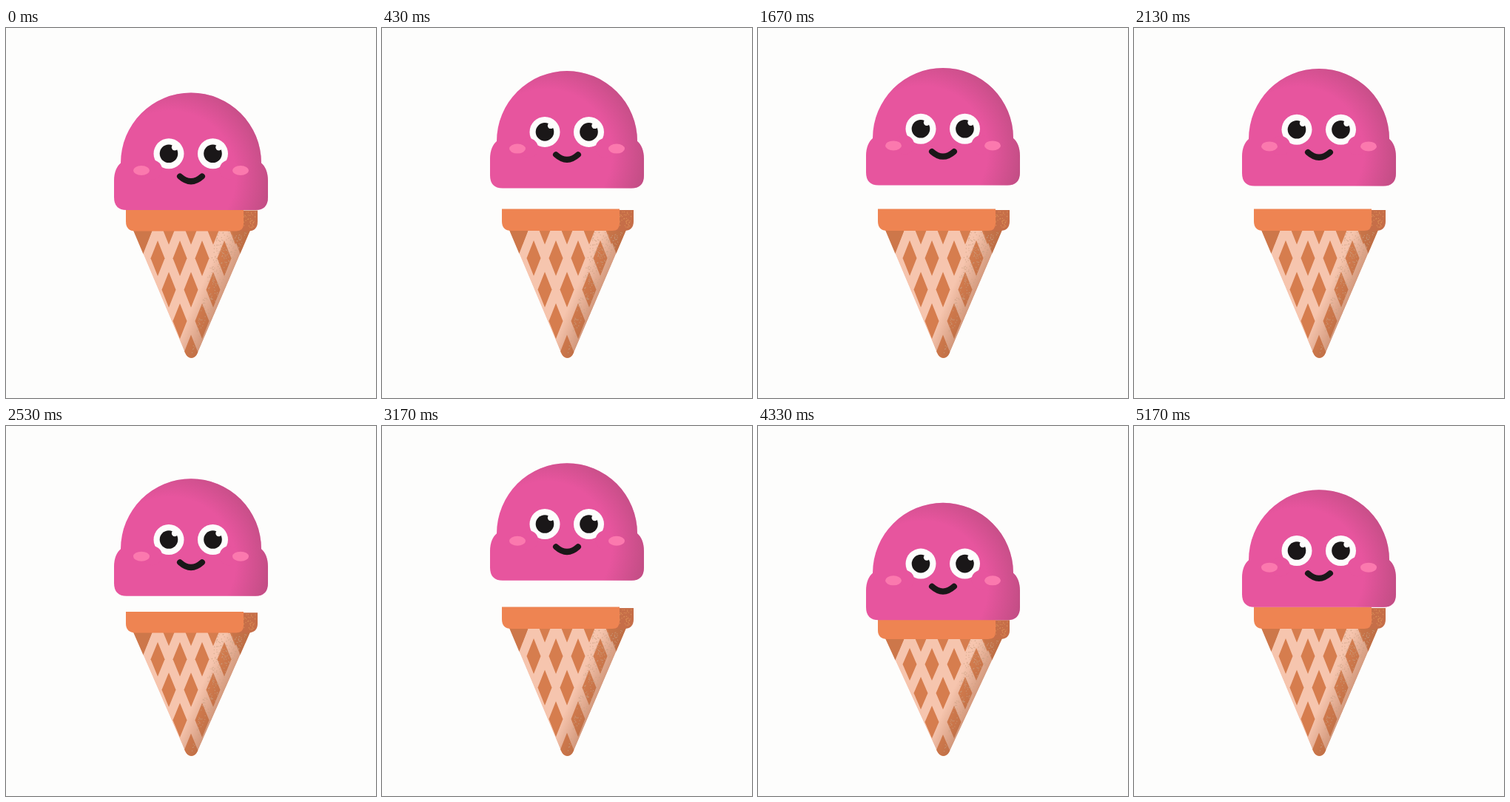
An HTML page that plays this animation: 500 px wide and 500 px high, repeating every 5210 ms.

```html
<!DOCTYPE html>
<html lang="en">
<head>
<meta charset="utf-8">
<title>Bouncing ice cream</title>
<style>
  html, body { margin: 0; width: 100%; height: 100%; overflow: hidden; background: #fdfdfc; }
  svg { display: block; width: 100vw; height: 100vh; }
</style>
</head>
<body>
<svg viewBox="0 0 500 500">
  <defs>
    <radialGradient id="scoopShade" gradientUnits="userSpaceOnUse" cx="222" cy="200" r="134">
      <stop offset=".66" stop-color="#b04a78" stop-opacity="0"/>
      <stop offset="1" stop-color="#b04a78" stop-opacity=".65"/>
    </radialGradient>
    <linearGradient id="coneShade" gradientUnits="userSpaceOnUse" x1="272" y1="330" x2="312" y2="348">
      <stop offset="0" stop-color="#a8623f" stop-opacity="0"/>
      <stop offset="1" stop-color="#a8623f" stop-opacity=".6"/>
    </linearGradient>
    <path id="wafer" d="M172 273H330L259 439Q256 446 250.500 446Q245 446 242 439Z"/>
    <path id="body" d="M155 182A95 95 0 0 1 345 182C350 186 354 194 354 206V228Q354 245.500 337 245.500H163Q146 245.500 146 228V206C146 194 150 186 155 182Z"/>
    <clipPath id="waferClip"><use href="#wafer"/></clipPath>
  </defs>

  <g id="cone">
    <g clip-path="url(#waferClip)">
      <use href="#wafer" fill="#f6c5ae"/>
      <g id="diamonds" fill="#d67d4e"></g>
      <path d="M170 272H198L185 306Z M332 272H304L317 306Z" fill="#cd774a"/>
      <use href="#wafer" fill="url(#coneShade)"/>
      <g id="grain" fill="#c9a184" opacity=".7"></g>
    </g>
    <path d="M300 246H340V261Q340 274 327 274H300Z" fill="#c66e48"/>
    <g id="rimGrain" fill="#e39a5c" opacity=".7"></g>
    <path d="M162 244.500H321V264Q321 274 311 274H175Q162 274 162 261Z" fill="#ee8452"/>
  </g>

  <g id="scoop">
    <use href="#body" fill="#e7559e"/>
    <use href="#body" fill="url(#scoopShade)"/>
    <g id="eyes"></g>
    <g fill="#fb79ae">
      <ellipse cx="183" cy="192" rx="11" ry="6.500"/>
      <ellipse cx="317" cy="192" rx="11" ry="6.500"/>
    </g>
    <path d="M235 200Q250 213.500 265 200" fill="none" stroke="#1a1718" stroke-width="8" stroke-linecap="round"/>
  </g>
</svg>
<script>
const $ = id => document.getElementById(id);

function add(parent, tag, attrs) {
  const el = document.createElementNS("http://www.w3.org/2000/svg", tag);
  for (const k in attrs) el.setAttribute(k, attrs[k]);
  parent.append(el);
}

// waffle pattern: staggered rows of diamonds
for (let row = 0; row < 5; row++) {
  const y = 268.5 + row * 42.5;
  for (let col = -3; col <= 3; col++) {
    const x = 250 + col * 30 + (row % 2 ? 15 : 0);
    add($("diamonds"), "path", { d: `M${x} ${y - 24}l9.5 24l-9.5 24l-9.5 -24Z` });
  }
}

// shaded grain along the right side of cone and rim
let seed = 7;
const random = () => (seed = seed * 16807 % 2147483647) / 2147483647;
for (let i = 0; i < 260; i++) {
  const k = Math.sqrt(random());
  const x = 251 + k * (34 + 40 * random());
  add($("grain"), "circle", { cx: x, cy: 440 - k * 164, r: 0.7 });
}
for (let i = 0; i < 40; i++) {
  add($("rimGrain"), "circle", { cx: 320 + 17 * random(), cy: 248 + 22 * random(), r: 0.7 });
}

// white, pupil and glint, with the cheek covering the lower outer rim
for (const [x, side] of [[220, -1], [279.5, 1]]) {
  const dot = (cx, cy, r, fill) => add($("eyes"), "circle", { cx, cy, r, fill });
  dot(x, 169.3, 20.5, "#fdfdfc");
  dot(x + side * 22, 191, 13, "#e7559e");
  dot(x, 169.3, 12.3, "#1a1718");
  dot(x + 8, 160.8, 4.2, "#fdfdfc");
}

// eleven bounces, then a short hold just before touchdown
const LOOP = 5210, BOUNCE = 470, LAST = 11 * BOUNCE - 0.5;

// [phase, downward shift]
const scoopSteps = [[0, 0], [.11, 24], [.213, 17], [.383, -15.5], [.553, -33],
  [.71, -37], [.872, -33], [.979, -16.5], [1, 0]];
const coneSteps = [[0, 0], [.11, 23.5], [.213, 16.5], [.383, 6.5], [.5, 0], [1, 0]];

// smooth curve through the steps without overshoot
function curve(steps) {
  const slope = steps.slice(1).map(([x, y], i) => (y - steps[i][1]) / (x - steps[i][0]));
  const tangent = steps.map((_, i) => {
    const a = slope[i - 1] ?? slope[i], b = slope[i] ?? a;
    return a * b > 0 ? 2 * a * b / (a + b) : 0;
  });
  return x => {
    let i = 0;
    while (i < slope.length - 1 && x > steps[i + 1][0]) i++;
    const [x0, y0] = steps[i], [x1, y1] = steps[i + 1];
    const w = x1 - x0, s = (x - x0) / w, r = 1 - s;
    return r * r * (1 + 2 * s) * y0 + s * s * (3 - 2 * s) * y1
      + w * s * r * (r * tangent[i] - s * tangent[i + 1]);
  };
}

const scoopY = curve(scoopSteps), coneY = curve(coneSteps);
const start = performance.now();

function draw() {
  const time = Math.min((performance.now() - start) % LOOP, LAST);
  const phase = time % BOUNCE / BOUNCE;
  const squash = 1 - coneY(phase) / 201;
  $("scoop").setAttribute("transform", `translate(0 ${scoopY(phase)})`);
  $("cone").setAttribute("transform", `translate(0 446) scale(1 ${squash}) translate(0 -446)`);
  requestAnimationFrame(draw);
}
draw();
</script>
</body>
</html>
```
